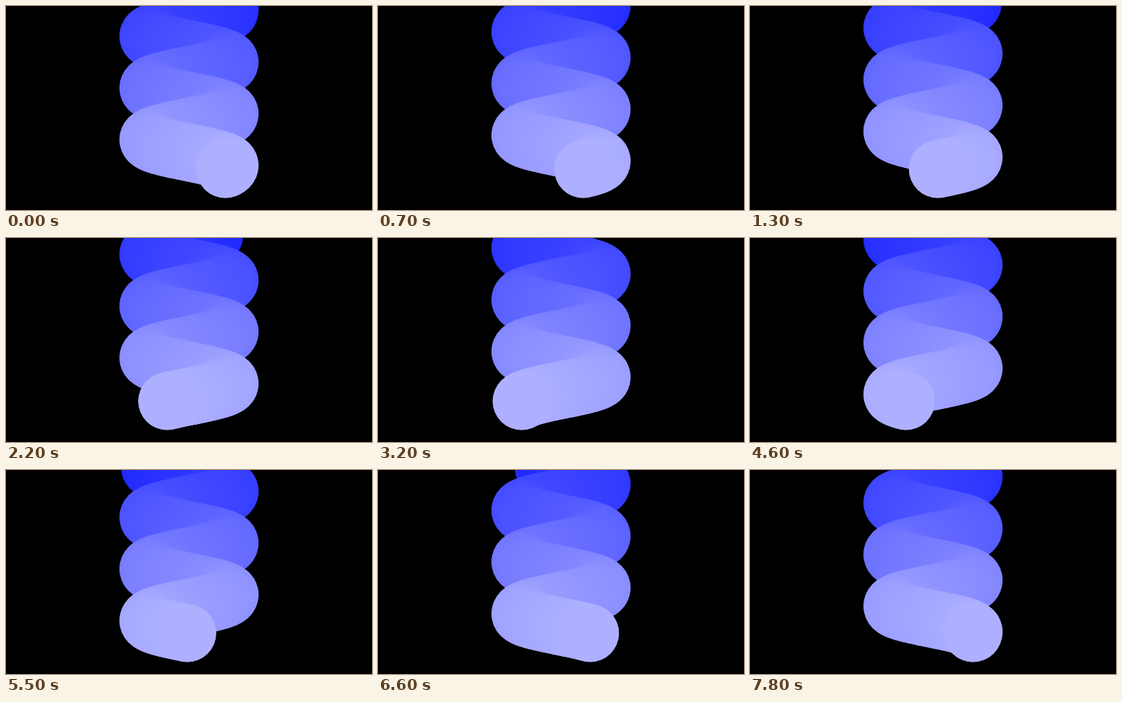
Recreate the animation shown at these times as an HTML page with a canvas. Size 529x296 px, loop 8000 ms.

```html
<!DOCTYPE html>
<html lang="en">
<head>
<meta charset="utf-8">
<title>Coiling trail</title>
<style>
  html, body { margin: 0; width: 100%; height: 100%; overflow: hidden; background: #000; }
  canvas { display: block; width: 100vw; height: 100vh; }
</style>
</head>
<body>
<canvas id="stage" width="529" height="296"></canvas>
<script>
const ctx = document.getElementById('stage').getContext('2d');

const LOOP = 8000, TICK = 100, LAST_STEP = 78;
const RISE = 0.915;            // px the trail climbs per step
const PITCH = 75;              // px between coils
const START = 5.4;             // px risen since the last right turn
const CX = 264.5, HEAD_Y = 236.7, SWING = 58.5, RADIUS = 42;
const TRAIL = 240;

function dot(x, y, color) {
  ctx.fillStyle = color;
  ctx.beginPath();
  ctx.arc(x, y, RADIUS, 0, Math.PI * 2);
  ctx.fill();
}

// Colour fades from pale lilac at the head to deep blue at the tail.
function shade(age) {
  return `rgb(${Math.round(174 - 0.59 * age)}, ${Math.round(176 - 0.56 * age)}, 255)`;
}

function draw(step) {
  const risen = START + step * RISE;
  ctx.fillStyle = '#000';
  ctx.fillRect(0, 0, 529, 296);
  for (let i = Math.floor(TRAIL / RISE); i >= 0; i--) {
    const age = i * RISE;
    const angle = (risen - age) / PITCH * Math.PI * 2;
    dot(CX + SWING * Math.cos(angle), HEAD_Y - age, shade(age));
  }
}

const begin = performance.now();
function frame() {
  const t = (performance.now() - begin) % LOOP;
  draw(Math.min(LAST_STEP, Math.floor(t / TICK)));
  requestAnimationFrame(frame);
}
frame();
</script>
</body>
</html>
```
